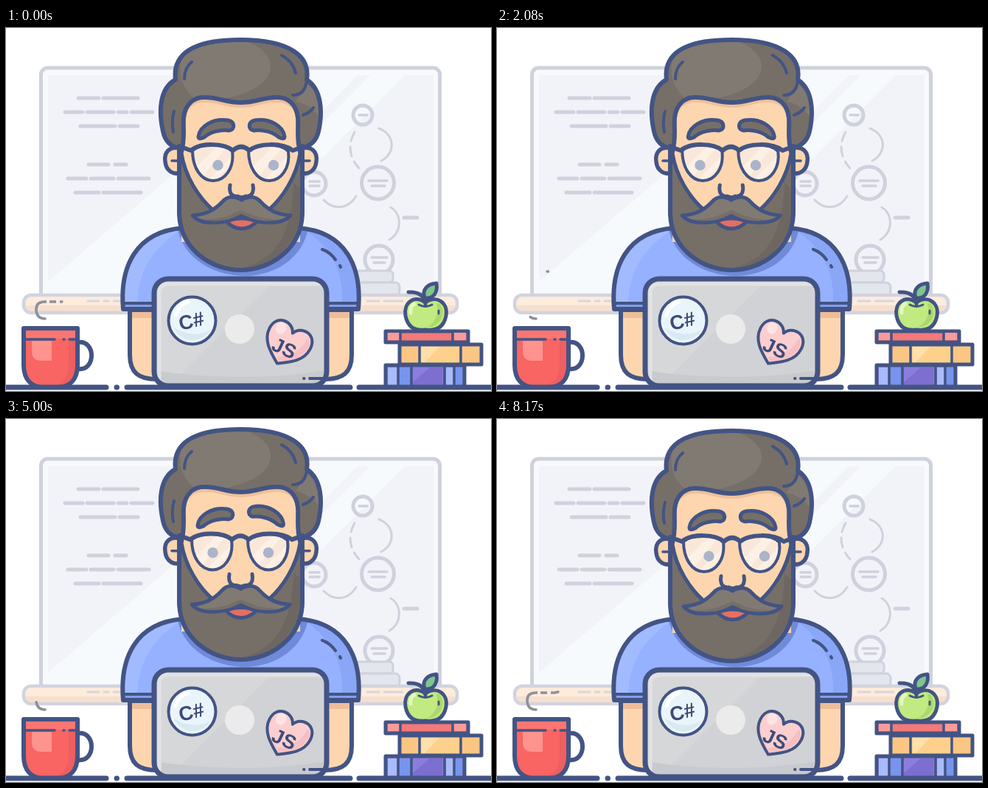
Animation, 658 px wide and 492 px high, one loop 8.21 s. Source, as an HTML page:

```html
<!DOCTYPE html>
<html lang="en">
<head>
<meta charset="utf-8">
<title>Developer at work</title>
<style>
html, body { margin: 0; width: 100%; height: 100%; overflow: hidden; background: #fff; }
svg { display: block; width: 658px; height: 492px; }
svg * { stroke-linecap: round; stroke-linejoin: round; }
.ink, .line { stroke: #435484; }
.line { fill: none; }
.line:not([stroke-width]) { stroke-width: 4; }
.hair { fill: #766f68; }
.lite { fill: #817a72; }
.skin { fill: #fdd6af; }
.board { fill: none; stroke: #cfd2dd; }
text { font: bold 27px "Liberation Sans", Arial, sans-serif; fill: #3e4b78; text-anchor: middle; }
</style>
</head>
<body>
<svg viewBox="0 0 658 492" stroke-width="6">
<defs>
  <clipPath id="panel"><path d="M57 64H580V362H57Z"/></clipPath>
  <clipPath id="shirtClip"><path id="shirt" d="M159 381C154 325 175 276 240 271H397C462 276 483 325 478 381Z"/></clipPath>
  <clipPath id="hairClip"><path id="hairShape" d="M236 163Q217 160 213 140C207 113 208 82 230 70C226 38 249 16 318 16C386 16 413 39 408 70C428 83 430 113 424 140Q420 158 401 163Z"/></clipPath>
  <clipPath id="beardClip"><path d="M235 165V249C235 300 279 328 318.500 328C358 328 402 300 402 249V165Z"/></clipPath>
  <clipPath id="lens"><path id="lensPath" d="M252 166C263 156 295 156 306 167C309 190 296 207 280 207C264 207 252 190 252 166Z"/></clipPath>
  <clipPath id="mugClip"><path id="mug" d="M24 407H97V457C97 477 86 487 70 487H51C35 487 24 477 24 457Z"/></clipPath>
  <clipPath id="lapClip"><rect id="laptop" x="201" y="340" width="234" height="145" rx="19"/></clipPath>
  <path id="hairline" d="M238 168C243 150 240 136 241 122C243 103 255 94 268 94C286 93 298 101 318.500 101C339 101 351 93 369 94C382 94 394 103 396 122C397 136 394 150 399 168"/>
  <mask id="gaps" maskUnits="userSpaceOnUse" x="0" y="280" width="150" height="130">
    <path d="M0 280H150V410H0Z" fill="#fff"/><path d="M55 366h4v10h-4zM68 366h5v10h-5z"/>
  </mask>
</defs>

<!-- whiteboard -->
<rect x="47.500" y="54" width="541" height="330" rx="9" fill="#f8f9fc" stroke="#cfd2dd" stroke-width="5"/>
<g clip-path="url(#panel)">
  <path d="M57 64H580V362H57Z" fill="#f2f3f8"/>
  <path d="M50 350L384 64H477L180 362H50ZM494 64H541L243 362H196Z" fill="#f6fafd"/>
</g>
<path class="board" stroke-width="5" d="M98 95H126M132 95H179M80 114H104M110 114H146M152 114H164M170 114H199M101 133H148M154 133H179
  M112 185H139M148 185H163M84 204H109M115 204H146M152 204H194M94 223H126M132 223H183M540 257H558"/>
<g class="board" stroke-width="5">
  <circle cx="484" cy="118" r="13"/><circle cx="418" cy="211" r="16"/>
  <circle cx="504.500" cy="210" r="22"/><circle cx="506" cy="314" r="19"/>
  <path stroke-width="3.500" d="M479 118H490M412 208H425M412 214H425M492 207H517M496 214H514M496 311H517M499 318H514"/>
  <path stroke-width="3" d="M506 136C528 144 529 170 509 180M431 233C444 247 464 246 475 228M522 243C537 252 538 276 520 287"/>
  <path stroke-width="3" stroke-dasharray="13 8" d="M473 141C463 158 466 176 479 190"/>
</g>
<g fill="#e4e6ed" stroke="#cfd2dd" stroke-width="3">
  <rect x="474" y="329" width="51" height="16" rx="5"/><rect x="464" y="345" width="70" height="18" rx="6"/>
</g>
<rect x="24" y="362" width="588" height="24" rx="10" fill="#fdebdc"/>
<path d="M26 376H610Q609 386 600 386H36Q28 386 26 376Z" fill="#f7dfcf"/>
<rect x="24" y="362" width="588" height="24" rx="10" fill="none" stroke="#d1d4de" stroke-width="4.500"/>
<path d="M111 370H126M133 370H139M146 370H155M490 370H506M513 370H538" fill="none" stroke="#d9d6da" stroke-width="3"/>

<g mask="url(#gaps)" fill="none" stroke="#8d909c" stroke-width="3.600">
  <path id="steamA" d="M53 394C44 394 41 388 41 381C41 374 45 371 53 371H76C92 371 98 355 98 337C98 322 86 311 72 311C57 311 47 322 47 334C47 346 54 353 64 353C74 353 80 347 80 341C80 334 75 330 68 330"/>
  <path id="steamB"/>
</g>

<!-- arms and shirt -->
<path id="arm" class="ink skin" d="M168 384V443C168 467 180 476 204 476H230V384Z"/>
<use href="#arm" transform="matrix(-1 0 0 1 637 0)"/>
<path d="M171 385H199V393H171ZM438 385H466V393H438Z" fill="#eebd99"/>
<use href="#shirt" fill="#95b1ff"/>
<g clip-path="url(#shirtClip)">
  <path d="M159 381C156 320 185 280 235 275C190 305 178 340 178 381Z" fill="#a2bbff"/>
  <path d="M478 270V381H455C461 334 442 296 400 270Z" fill="#8aa6f6"/>
  <path d="M231 255C231 309 279 336 324 336C372 336 413 303 411 255Z" fill="#6f8ad8"/>
  <path d="M159 373H478V384H159Z" fill="#839eee"/>
</g>
<use href="#shirt" class="ink" fill="none"/>
<path class="line" d="M162 373H202M435 373H475M429 300Q440 304 447 314M453 322L454 324"/>

<g id="head">
  <g id="ears">
    <g id="ear">
      <path class="ink skin" stroke-width="5.500" d="M238 164C222 158 214 169 216 181C217 193 228 202 240 194Z"/>
      <path class="line" stroke-width="3.500" d="M225 180H235"/>
    </g>
    <use href="#ear" transform="matrix(-1 0 0 1 637 0)"/>
  </g>
  <use href="#hairShape" class="hair"/>
  <path clip-path="url(#hairClip)" class="lite" d="M298 12C374 20 384 78 300 95H255C222 67 231 10 298 12ZM408 76C422 86 430 106 426 122C416 108 405 102 393 100Z"/>
  <use href="#hairShape" class="ink" fill="none"/>
  <path d="M238 160H399V290H238Z" class="skin"/>
  <use href="#hairline" fill="#efc09a"/>
  <use href="#hairline" y="7" class="skin"/>
  <use href="#hairline" class="line" stroke-width="6"/>
  <path class="line" d="M242 69Q242 54 252 46M374 37Q389 45 393 61M228 113Q224 126 227 141M403 118Q412 115 417 108M389 91Q406 91 408 71"/>

  <!-- beard -->
  <path class="hair" d="M235 160L238 170C243 202 262 230 280 246H357C375 230 394 202 399 170L402 160V249C402 300 358 328 318.500 328C279 328 235 300 235 249Z"/>
  <path clip-path="url(#beardClip)" d="M402 220V270L355 328H305C361 321 388 286 390 210Z" fill="#6e6761"/>
  <path class="ink" fill="none" d="M235 160V249C235 300 279 328 318.500 328C358 328 402 300 402 249V160"/>
  <path class="line" stroke-width="5" d="M238 170C243 202 262 230 280 246M399 170C394 202 375 230 357 246"/>

  <g id="face">
    <path class="ink" stroke-width="5" fill="#e46f63" d="M298 262Q318.500 254 340 262Q330 272 318.500 272Q307 272 298 262Z"/>
    <path class="ink skin" stroke-width="5" d="M303 213C301 224 306 229 313 228Q318 231 324 228C331 229 336 224 334 213"/>
    <path class="ink lite" stroke-width="5" d="M318.500 233C310 228 300 227 293 235C281 248 269 253 252 254C264 269 299 265 318.500 254C338 265 373 269 385 254C368 253 356 248 344 235C337 227 327 228 318.500 233Z"/>
    <path class="hair" d="M267 259C294 260 305 252 318.500 247C332 252 343 260 370 259C347 265 333 259 318.500 252C304 259 290 265 267 259Z"/>
    <path id="browL" class="ink hair" stroke-width="5" d="M260 147C262 133 280 122 300 125C310 127 310 138 302 139C290 137 276 141 268 148Q260 152 260 147Z"/>
    <use id="browR" href="#browL"/>
    <g id="lensFill">
      <use href="#lensPath" fill="#f9e8d9"/>
      <path clip-path="url(#lens)" d="M251 195L292 154H304L264 204ZM271 208L313 166V176L281 209Z" fill="#fdf1e6"/>
    </g>
    <use href="#lensFill" x="76"/>
    <g id="eyes" fill="#aab4cb"><circle cx="280.500" cy="186" r="7.200"/><circle cx="356" cy="186" r="7.200"/></g>
    <use href="#lensPath" class="line"/>
    <use href="#lensPath" class="line" x="76"/>
    <path class="line" stroke-width="6" d="M236 161L250 166C263 155 295 156 307 166Q318 156 329 166C341 156 374 155 388 166L402 161"/>
  </g>
</g>

<!-- laptop -->
<use href="#laptop" fill="#d1d2d5"/>
<g clip-path="url(#lapClip)">
  <path d="M201 340H367L222 484H201Z" fill="#d6d7d9"/>
  <path d="M201 464Q318 482 435 464V488H201Z" fill="#c8cace"/>
  <path d="M208 482V359Q208 347 221 347H427" fill="none" stroke="#e2e2e4" stroke-width="5"/>
</g>
<use href="#laptop" class="ink" fill="none" stroke-width="7"/>
<path class="line" d="M404 475H404.500M412 475H438"/>
<circle cx="317" cy="408" r="20" fill="#ebebec"/>
<circle cx="252.500" cy="396.500" r="32" fill="#eaf5fb" stroke="#435484" stroke-width="4"/>
<path d="M228 406A27 27 0 0 0 277 409Q255 422 228 406Z" fill="#d9e9f4"/>
<path d="M230 389Q234 375 247 371" fill="none" stroke="#fff" stroke-width="5"/>
<text transform="translate(253.500 406) rotate(-13)">C#</text>
<g transform="translate(382 427) rotate(27)">
  <path fill="#fbcfd0" stroke="#435484" stroke-width="4" d="M0-15C-6-30-31-29-31-7C-31 12-14 22 0 31C14 22 31 12 31-7C31-29 6-30 0-15Z"/>
  <path d="M28-8C27 10 14 19 0 28L-4 23C14 13 21-1 21-18Q27-17 28-8Z" fill="#f6bfc3"/>
  <ellipse cx="-17" cy="-14" rx="7" ry="8" fill="#fde4e3"/>
</g>
<text transform="translate(373.500 442.500) rotate(25)">JS</text>

<!-- mug -->
<path class="line" stroke-width="6" d="M98 426C122 423 122 465 98 462"/>
<use href="#mug" fill="#f86562"/>
<g clip-path="url(#mugClip)">
  <path d="M85 407H100V490H38C75 488 85 476 85 455Z" fill="#ee5f61"/>
  <path d="M24 407H97V421H24Z" fill="#fb7672"/>
  <path d="M35 424H62V451H48Q35 451 35 438Z" fill="#ff938d"/>
</g>
<use href="#mug" class="ink" fill="none"/>
<path class="line" stroke-width="3.500" d="M27 422H66M78 422H79M86 422H95"/>

<!-- books and fruit -->
<g class="ink" stroke-width="5">
  <path fill="#8b7ddd" d="M515 457H622V486H515Z"/>
  <path fill="#fdd08c" d="M534 429H645V456H534Z"/>
  <path fill="#f47979" d="M515 411H627V426H515Z"/>
</g>
<path d="M518 460H531V484H518ZM597 460H607V484H597Z" fill="#a9bbfa"/>
<path d="M534 460H549V484H534ZM609 460H619V484H609Z" fill="#7795ee"/>
<path d="M552 480L575 460H592V484H552Z" fill="#7c6fd0"/>
<path d="M537 432H558V453H537ZM619 432H642V453H619Z" fill="#fbc683"/>
<path d="M564 432H588L568 453H564Z" fill="#ffdfaa"/>
<path d="M518 413H534V423H518ZM607 413H624V423H607Z" fill="#fa9b98"/>
<path class="line" stroke-width="3.500" d="M532 458V484M550 458V484M595 458V484M608 458V484M561 431V454M617 431V454M535 412V425M606 412V425"/>
<path class="ink" stroke-width="5" fill="#c1ea80" d="M569 372C553 361 539 373 542 390C545 405 554 411 569 409C584 411 594 405 597 390C600 373 585 361 569 372Z"/>
<path d="M588 373C598 384 592 404 571 406C582 399 588 389 584 373Z" fill="#acd96d"/>
<path d="M549 386Q548 377 554 374" fill="none" stroke="#e4f8bd" stroke-width="5"/>
<path class="line" stroke-width="5" d="M569 374Q567 357 546 358"/>
<path class="ink" stroke-width="5" fill="#7fc58c" d="M568 366C564 354 572 347 584 346C586 359 580 367 568 366Z"/>
<path class="line" stroke-width="3" d="M560 375Q569 380 578 375M587 383V387"/>

<path class="line" stroke-width="7" d="M0 487H136M150 487H150.500M164 487H467M479 487H658"/>
</svg>
<script>
const LOOP = 8210, STEAM = 2700, STEAM_START = 2000;
const $ = id => document.getElementById(id);
const [head, face, eyes, ears, browL, browR, steamA, steamB] =
  ['head', 'face', 'eyes', 'ears', 'browL', 'browR', 'steamA', 'steamB'].map($);
steamB.setAttribute('d', steamA.getAttribute('d'));
const scale = steamA.getTotalLength() / 252;

// [time, value] pairs, joined by straight lines
const gaze = [[0, 7], [400, 6], [880, 3], [1500, -3], [2080, -5], [3400, -5], [3920, -2.500], [4500, -.5], [5000, 0], [6700, 0], [7500, 5], [8170, 7]];
const lift = [[4200, 0], [5000, .4], [5800, 1], [6700, 1], [7300, .6], [8000, 0]];
const front = [[0, 0], [80, 8], [300, 17], [700, 60], [770, 67], [1580, 200], [1680, 215], [1920, 250], [2000, 252]];
const rear = [[850, 0], [1580, 105], [1680, 120], [1920, 165], [2400, 228], [2820, 252]];

function at(keys, t) {
  const i = keys.findIndex(k => k[0] > t);
  if (i < 0) return keys[keys.length - 1][1];
  if (!i) return keys[0][1];
  const [t0, a] = keys[i - 1], [t1, b] = keys[i];
  return a + (b - a) * (t - t0) / (t1 - t0);
}
const move = (el, x, y, more = '') => el.setAttribute('transform', `translate(${x} ${y}) ${more}`);

function drawSteam(el, phase) {
  const tail = at(rear, phase) * scale, length = at(front, phase) * scale - tail;
  el.style.display = length > .3 ? '' : 'none';
  el.setAttribute('stroke-dasharray', `${Math.max(length, 0)} 999`);
  el.setAttribute('stroke-dashoffset', -tail);
}

function draw(now) {
  const t = now % LOOP, g = at(gaze, t), k = at(lift, t);
  move(head, 0, -5 * k);
  move(ears, 0, 2 * k);
  move(face, g / 7, -1.500 * k);
  move(eyes, g * 6 / 7, -5.500 * k);
  move(browL, 0, -k);
  // the right brow mirrors the left one, so it also takes its motion
  move(browR, 0, -7 * k, `rotate(${7 * k} 354 136) matrix(-1 0 0 1 637 0)`);
  const phase = (t - STEAM_START + STEAM) % STEAM;
  drawSteam(steamA, phase);
  drawSteam(steamB, phase + STEAM);
}

const start = performance.now();
(function tick() {
  draw(performance.now() - start);
  requestAnimationFrame(tick);
})();
</script>
</body>
</html>
```
